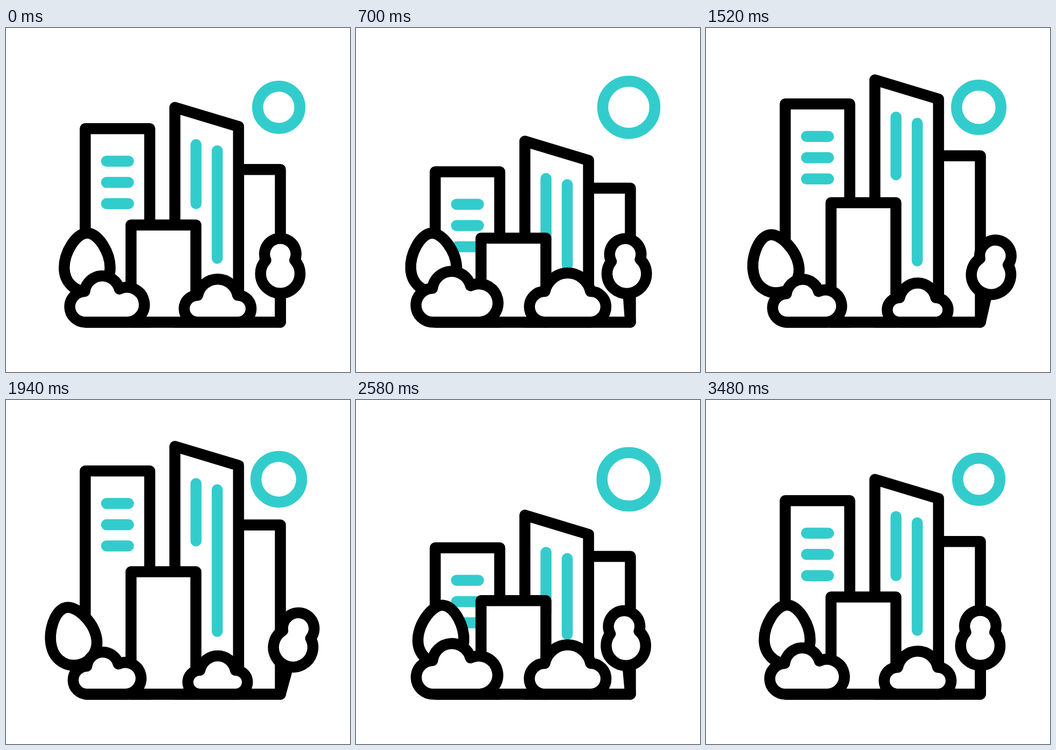
Write an HTML page that moves like this. It is 640x640 px and loops after 3600 ms.

```html
<!DOCTYPE html>
<html lang="en">
<head>
<meta charset="utf-8">
<title>City</title>
<style>
  html, body { margin: 0; width: 100%; height: 100%; overflow: hidden; background: #fff; }
  svg { display: block; width: 100vw; height: 100vh; }
  path, circle { fill: #fff; stroke: #000; stroke-width: 20.5; stroke-linecap: round; stroke-linejoin: round; }
  .teal { stroke: #3cc; fill: none; }
</style>
</head>
<body>
<svg viewBox="0 0 640 640">
  <circle id="sun" class="teal" cx="507.5" cy="147.5"/>
  <path id="right"/>
  <path id="left"/>
  <path id="rows" class="teal" d="M187 247.7h40.8M187 287.3h40.8M187 326.8h40.8"/>
  <path id="tall"/>
  <path id="columns" class="teal"/>
  <path id="front"/>
  <path d="M150 547.2H510.5"/>
  <g id="treeL">
    <path d="M151 381.5C172 381.5 193.7 418 193.7 446C193.7 472 175 490.5 151 490.5C127 490.5 108.3 472 108.3 446C108.3 418 130 381.5 151 381.5Z"/>
  </g>
  <g id="treeR">
    <path d="M510.5 547.2V480"/>
    <path d="M537.3 432.1A36.7 36.7 0 1 1 483.3 432.1A29.3 29.3 0 1 1 537.3 432.1Z"/>
  </g>
  <path id="cloudL" d="M148 547.2A28.6 28.6 0 0 1 146.4 490A33 33 0 0 1 211 485.6A32.4 32.4 0 1 1 226.5 547.2Z"/>
  <path id="cloudR" d="M356.3 547.2A25 25 0 0 1 356.7 497.2A38 38 0 0 1 431 497.2A25 25 0 0 1 431 547.2Z"/>
</svg>
<script>
const LOOP = 3600, GROUND = 547.2, STROKE = 20.5;
const $ = id => document.getElementById(id);
const linear = p => p;
const sine = p => (1 - Math.cos(Math.PI * p)) / 2;

// Eases from pose to pose; each pose is [time, value].
const move = (ease, ...poses) => now => {
  const i = poses.findIndex(([t]) => t > now);
  if (i < 0) return poses[poses.length - 1][1];
  if (i === 0) return poses[0][1];
  const [t0, v0] = poses[i - 1], [t1, v1] = poses[i];
  return v0 + (v1 - v0) * ease((now - t0) / (t1 - t0));
};

// Shared gesture: wind up, go to the peak in two steps, swing back through the wind-up, rest.
// lagIn and lagOut delay the way there and the way back.
const gesture = (windUp, peak, lagIn, lagOut, rebound = 0) => move(sine,
  [80, 0], [600 + lagIn, windUp], [1250 + lagIn, 0.83 * peak], [1500, 0.83 * peak], [1800, peak],
  [1860 + lagOut, peak], [2340 + lagOut, windUp], [2670 + lagOut, rebound], [3040 + lagOut, 0]);

const sunRadius = move(linear, [0, 39.3], [840, 50.4], [1670, 39.3], [2570, 50], [3480, 39.3]);
const columnFoot = move(sine, [80, 0], [800, 13], [1900, 2], [2300, 10], [3200, 0]);

// Left wall, right wall, their heights and the roof's movement.
const buildings = {
  right: [432.6, 510.5, 263.2, 263.2, gesture(35, -30.7, 80, 345)],
  left: [147.4, 267.4, 187.2, 187.2, gesture(88, -55.2, 0, 231)],
  tall: [314.2, 432.6, 147.7, 183.4, gesture(67.4, -61.5, 20, 266)],
  front: [232.6, 353.3, 366.5, 366.5, gesture(27.7, -50, 10, 20)]
};

// Pivot and angle.
const trees = {
  treeL: [150.5, gesture(8.3, -14.2, -265, 110, -4.6)],
  treeR: [510.5, gesture(-6, 15.4, -30, 176, 2.9)]
};

// Middle and growth.
const clouds = {
  cloudL: [189, gesture(0.101, -0.09, 60, 183)],
  cloudR: [393.6, gesture(0.151, -0.11, 25, 283)]
};

function draw(time) {
  $('sun').setAttribute('r', sunRadius(time));

  const shift = {};
  for (const [id, [x1, x2, y1, y2, lift]] of Object.entries(buildings)) {
    const dy = shift[id] = lift(time);
    $(id).setAttribute('d', `M${x1} ${GROUND}V${y1 + dy}L${x2} ${y2 + dy}V${GROUND}Z`);
  }
  $('rows').setAttribute('transform', `translate(0 ${shift.left})`);
  $('columns').setAttribute('d', `M353.5 ${217 + shift.tall}V${326.7 + 1.05 * shift.tall}`
    + `M393 ${228.5 + shift.tall}V${428.4 + columnFoot(time)}`);

  for (const [id, [x, angle]] of Object.entries(trees))
    $(id).setAttribute('transform', `rotate(${angle(time)} ${x} ${GROUND})`);

  for (const [id, [x, growth]] of Object.entries(clouds)) {
    const s = 1 + growth(time);
    $(id).setAttribute('transform', `translate(${x} ${GROUND}) scale(${s}) translate(${-x} ${-GROUND})`);
    $(id).style.strokeWidth = STROKE / s;
  }
}

const start = performance.now();
function tick() {
  draw((performance.now() - start) % LOOP);
  requestAnimationFrame(tick);
}
tick();
</script>
</body>
</html>
```
